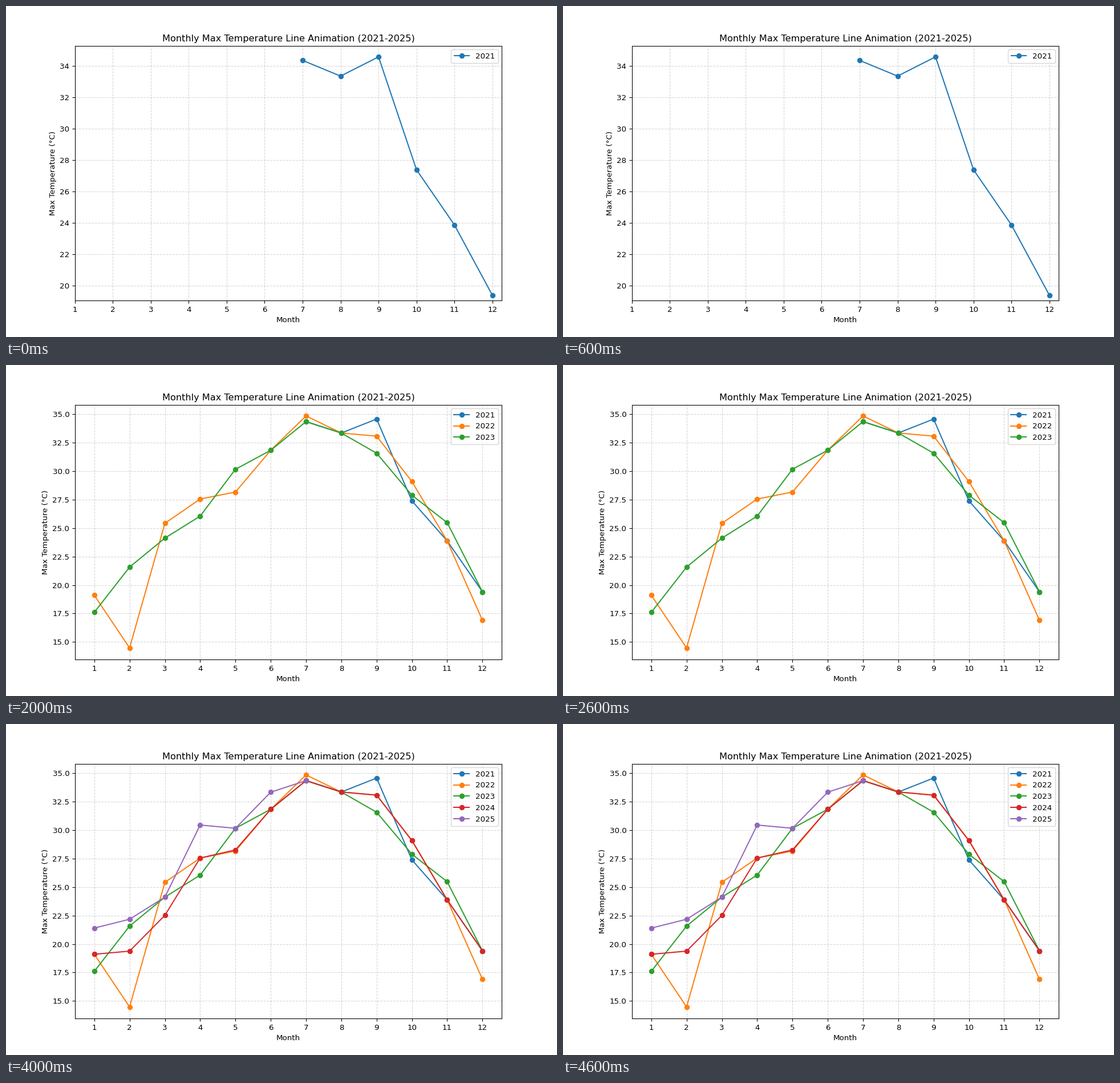
A matplotlib script that plays this animation: 966 px wide and 580 px high, repeating every 5 s.

```python
import numpy as np
import matplotlib.pyplot as plt
from matplotlib.animation import FuncAnimation

WIDTH, HEIGHT, DPI = 966, 580, 96.6
EPS = 1e-6  # keeps the pixel size from being rounded down

YEARS = range(2021, 2026)
SPAN = {2021: (7, 12), 2025: (1, 7)}  # years with only part of their months

# Unusually warm or cold months, in °C away from the seasonal curve
SPELLS = {
    2021: {9: 1.5, 10: -1.7},
    2022: {2: -4.9, 3: 1.3, 5: -2.0, 7: 0.5, 12: -2.5},
    2023: {1: -1.5, 2: 2.2, 4: -1.5, 9: -1.5, 10: -1.2, 11: 1.6},
    2024: {3: -1.6, 5: -1.9},
    2025: {1: 2.3, 2: 2.8, 4: 2.9, 6: 1.5},
}


def season(month):
    """Typical maximum temperature: a yearly wave with a few overtones."""
    a = 2 * np.pi * month / 12
    return (27.11 - 6.22 * np.cos(a) - 4.48 * np.sin(a)
            - 1.15 * np.cos(2 * a) - 0.65 * np.sin(2 * a)
            + 0.48 * np.sin(4 * a) - 0.34 * np.cos(6 * a))


def series(year):
    first, last = SPAN.get(year, (1, 12))
    months = np.arange(first, last + 1)
    spells = SPELLS[year]
    return months, season(months) + [spells.get(m, 0) for m in months]


fig, ax = plt.subplots(
    figsize=((WIDTH + EPS) / DPI, (HEIGHT + EPS) / DPI), dpi=DPI)


def update(i):
    """Show every year up to the i-th."""
    ax.clear()
    for year in YEARS[:i + 1]:
        ax.plot(*series(year), marker="o", label=str(year))
    ax.set_title("Monthly Max Temperature Line Animation (2021-2025)")
    ax.set_xlabel("Month")
    ax.set_ylabel("Max Temperature (°C)")
    ax.set_xticks(range(1, 13))
    # The first year starts in July, so the view is tighter.
    if i == 0:
        ax.set(xlim=(1, 12.25), ylim=(19.06, 35.29))
    else:
        ax.set(xlim=(0.45, 12.55), ylim=(13.45, 35.84))
    ax.grid(True, linestyle="--", alpha=0.5)
    ax.legend(loc="upper right")
    return ax.lines


anim = FuncAnimation(fig, update, frames=len(YEARS), interval=1000,
                     repeat=True, repeat_delay=0, blit=False)
plt.show()
```
